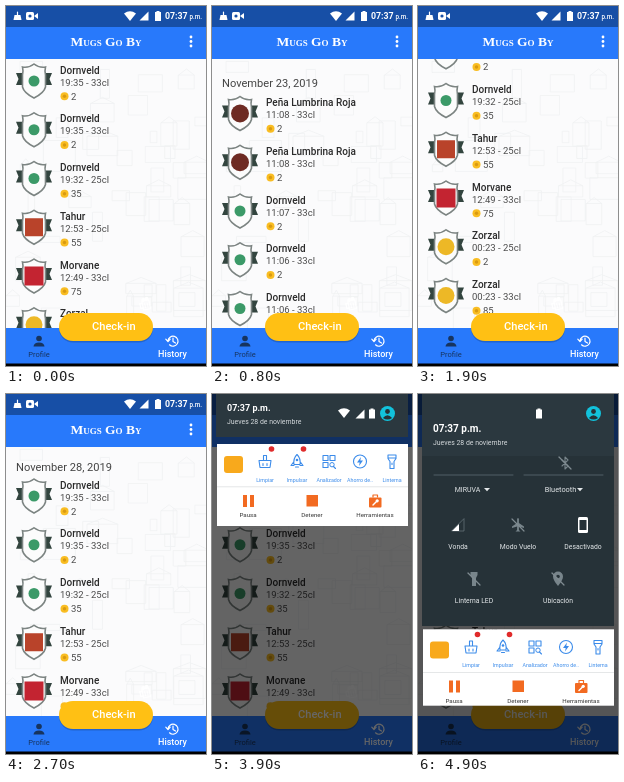
Write an HTML page that moves like this. It is 200x360 px and loops after 5000 ms.

```html
<!DOCTYPE html>
<html lang="en">
<head>
<meta charset="utf-8">
<title>Check-in history</title>
<style>
  html, body { margin: 0; width: 100%; height: 100%; overflow: hidden; background: #000; }
  svg { display: block; width: 100vw; height: 100vh; font-family: Roboto, sans-serif; }
</style>
</head>
<body>
<svg id="stage" viewBox="0 0 200 360"></svg>
<script>
const LOOP = 5000, STEP = 100;
const BLUE = '#2879fb', AMBER = '#ffc014', ORANGE = '#f26a21', PANEL = '#263238', INK = '#2b2b2b';
const stage = document.getElementById('stage');

// ---- markup helpers ----
const rect = (x, y, w, h, fill, more = '') =>
  `<rect x="${x}" y="${y}" width="${w}" height="${h}" fill="${fill}" ${more}/>`;
const dot = (x, y, r, fill) => `<circle cx="${x}" cy="${y}" r="${r}" fill="${fill}"/>`;
const fillPath = (d, fill) => `<path d="${d}" fill="${fill}"/>`;
const line = (d, color, w = 1) =>
  `<path d="${d}" fill="none" stroke="${color}" stroke-width="${w}" stroke-linecap="round" stroke-linejoin="round"/>`;
const text = (x, y, size, fill, str, more = '') =>
  `<text x="${x}" y="${y}" font-size="${size}" fill="${fill}" ${more}>${str}</text>`;
const mid = (x, y, size, fill, str, more = '') =>
  text(x, y, size, fill, str, 'text-anchor="middle" ' + more);
const at = (x, y, body, more = '') => `<g transform="translate(${x} ${y})" ${more}>${body}</g>`;

// ---- icons, centred on 0,0 ----
const wifi = fill => fillPath('M0 5 L-6 -2.5 Q0 -7 6 -2.5 Z', fill);
const signal = fill => fillPath('M-4.5 4.5 H4.5 V-4.5 Z', fill);
const battery = fill => fillPath('M-3 -4 H-1.5 V-5 H1.5 V-4 H3 V5 H-3 Z', fill);
const avatar = dot(0, 0, 7.5, '#12c2dc') + dot(0, -2, 2.4, PANEL) +
  fillPath('M-4.6 4.4 Q0 -1 4.6 4.4 Q0 7.5 -4.6 4.4 Z', PANEL);
const slash = line('M-6 -6 L6 6', '#7f8b91', 1.2);

// ---- list ----
const BEERS = {
  D: ['Dornveld', dot(0, 0, 5.5, '#3c9a68')],
  P: ['Peña Lumbrina Roja', dot(0, 0, 9, '#6e2b23')],
  T: ['Tahur', rect(-9, -9, 18, 18, '#b9432a')],
  M: ['Morvane', rect(-9.5, -9.5, 19, 19, '#c32431')],
  Z: ['Zorzal', dot(0, 0, 8.5, '#edb826')]
};
const SECTIONS = [
  { date: 'November 28, 2019', top: 94.5, gap: 18, rows: [
    'D 19:35 33 2', 'D 19:35 33 2', 'D 19:32 25 35', 'T 12:53 25 55',
    'M 12:49 33 75', 'Z 00:23 25 2', 'Z 00:23 33 85'] },
  { date: 'November 23, 2019', top: 473.5, gap: 19.5, rows: [
    'P 11:08 33 2', 'P 11:08 33 2', 'D 11:07 33 2', 'D 11:06 33 2',
    'D 11:06 33 2', 'D 11:05 33 2'] }
];
const ROW = 48.75;
const SHIELD = 'M-11.5 -14 Q-5 -13 0 -17 Q5 -13 11.5 -14 Q10.5 -10 11.5 -6 V6 Q10 12 0 17 Q-10 12 -11.5 6 V-6 Q-10.5 -10 -11.5 -14 Z';

function badge(mark) {
  return fillPath('M-18 -8 H18 L15.5 -2 L18 4 H-18 L-15.5 -2 Z', '#33453f') +
    `<path d="${SHIELD}" fill="#fcfcfc" stroke="#7c8482" stroke-width="1.6"/>` + mark;
}

function row(spec, y) {
  const [key, time, size, points] = spec.split(' ');
  const [name, mark] = BEERS[key];
  return at(0, y,
    at(28, 7.5, badge(mark)) +
    text(54, 0, 10, INK, name, 'font-weight="500"') +
    text(54, 12, 9.5, '#4a4a4a', `${time} - ${size}cl`) +
    dot(58.5, 22.8, 4, '#f9bd22') + dot(58.5, 22.8, 1.7, '#d99a12') +
    text(65, 26, 9.5, '#4a4a4a', points));
}

const list = SECTIONS.map(s =>
  text(10, s.top - s.gap, 11.1, '#444', s.date) +
  s.rows.map((r, i) => row(r, s.top + i * ROW)).join('')).join('');

// Faint sketch of houses behind the list
function backdrop() {
  let seed = 7, out = '';
  const rnd = n => (seed = (seed * 16807) % 2147483647) / 2147483647 * n;
  for (let i = 0; i < 46; i++) {
    const x = rnd(190), y = 55 + rnd(255), w = 6 + rnd(26), h = 5 + rnd(26);
    out += `M${x} ${y}h${w}v${h}h${-w}z`;
    if (i % 3 === 0) out += `M${x} ${y}l${w / 2} -6l${w / 2} 6`;
  }
  return line(out, '#f0f1f3', 0.8);
}

// ---- app chrome ----
const statusBar = rect(0, 0, 200, 21, '#174fa6') +
  line('M11.5 6 V9', '#fff', 1.2) + fillPath('M8.5 9 H14.5 L15.5 14 H7.5 Z', '#fff') +
  rect(20, 6, 8, 8, '#fff', 'rx="1.5"') + fillPath('M28 10 L32 7 V13 Z', '#fff') + dot(24, 10, 1.6, '#174fa6') +
  at(124, 10, wifi('#fff')) + at(138, 10, signal('#fff')) + at(152, 10, battery('#fff')) +
  text(159, 13, 8.8, '#fff', '07:37', 'font-weight="700"') +
  text(183.5, 13, 6.3, '#fff', 'p.m.', 'font-weight="500"');

const appBar = rect(0, 21, 200, 32, BLUE) +
  mid(100, 40, 13.5, '#fff', 'Mugs Go By',
    'font-family="Liberation Serif, serif" font-weight="700" style="font-variant:small-caps"') +
  [31, 35.5, 40].map(y => dot(185, y, 1.4, '#fff')).join('');

const navBar = rect(0, 322, 200, 36, BLUE) + rect(0, 357.5, 200, 2.5, '#000') +
  dot(33, 332.5, 2.8, '#17345f') + fillPath('M27.5 340.5 Q28 336.5 33 336.5 Q38 336.5 38.5 340.5 Z', '#17345f') +
  mid(33, 351, 7.5, '#17345f', 'Profile') +
  line('M162 335 A5 5 0 1 1 163.5 338.8 M159.8 333.2 L162 335.6 L164.2 333.2 M167 332 V335.5 L169.5 337', '#fff', 1.2) +
  mid(166.5, 351, 9, '#fff', 'History', 'font-weight="500"');

const mug = line('M-3.5 -3 H3.5 V6 H-3.5 Z M-3.5 -1 H-6 V4 H-3.5', '#fff', 1.2) +
  line('M-1.2 0 V4 M1.3 0 V4', '#fff', 0.9) + dot(-2, -4, 1.8, '#fff') + dot(1.5, -4.3, 2, '#fff');
const button = rect(53, 308.5, 94, 28, '#000', 'rx="14" opacity=".18"') +
  rect(53, 307, 94, 28, AMBER, 'rx="14"') +
  at(75, 320, mug, 'style="rotate:-12deg"') +
  text(86, 324, 11.1, '#fff', 'Check-in', 'font-weight="500"');

// ---- notification cards, y measured from the top of the first card ----
const TOOL = '#3b8bea';
const tools = [
  ['Limpiar', 53, line('M-6 -1 H6 L5 6 H-5 Z M-2 2 V4 M2 2 V4 M-1.5 -1 V-6 H1.5 V-1', TOOL, 1.1)],
  ['Impulsar', 85, line('M0 -7 Q4 -3 3 3 H-3 Q-4 -3 0 -7 Z M-3 0 L-6 4 H-3 M3 0 L6 4 H3 M-1.5 5.5 H1.5', TOOL, 1.1) + dot(0, -1.5, 1.3, TOOL)],
  ['Analizador', 117, line('M-6 -6 H-1 V-1 H-6 Z M1 -6 H6 V-1 H1 Z M-6 1 H-1 V6 H-6 Z M4.5 5 L6.5 7', TOOL, 1.1) +
    `<circle cx="3" cy="3.2" r="2.2" fill="none" stroke="${TOOL}"/>`],
  ['Ahorro de..', 148, `<circle r="6.5" fill="none" stroke="${TOOL}" stroke-width="1.1"/>` + fillPath('M1 -4.5 L-3 1 H-.3 L-1 4.5 L3 -1 H.3 Z', TOOL)],
  ['Linterna', 180, line('M-4 -6.5 H4 V-3 L2 0 V7 H-2 V0 L-4 -3 Z M-4 -3.5 H4 M0 1.5 V3', TOOL, 1.1)]
];
const card1 = rect(5, 0, 191, 42.5, '#fff') +
  rect(12, 12, 19, 17, '#f8a91c', 'rx="3"') +
  tools.map(([label, x, icon]) => at(x, 17.5, icon) + mid(x, 37.8, 5.3, TOOL, label)).join('') +
  dot(59.5, 5, 2.8, '#e02b2b') + dot(91.5, 5, 2.8, '#e02b2b');

const actions = [['Pausa', 36], ['Detener', 100], ['Herramientas', 163]];
const card2 = rect(5, 43.2, 191, 45, '#fff') +
  rect(31, 51, 4, 12, ORANGE) + rect(38, 51, 4, 12, ORANGE) +
  rect(94.5, 51, 11.5, 11.5, ORANGE) +
  rect(157, 53.5, 12.5, 10, ORANGE, 'rx="1"') + line('M161 53 V51 H165.5 V53', ORANGE, 1.2) +
  line('M161 61 L165.5 56.5', '#fff', 1.4) + dot(165.2, 56.8, 1.6, '#fff') +
  actions.map(([label, x]) => mid(x, 73.2, 6.2, '#333', label)).join('');

// ---- quick settings tiles, y measured from the panel's bottom edge ----
const GREY = '#78858b';
const plane = fillPath('M-.9 -6 Q0 -8 .9 -6 V-2 L6 1.5 V3 L.9 1.5 V5 L2.5 6.5 H-2.5 L-.9 5 V1.5 L-6 3 V1.5 L-.9 -2 Z', GREY);
const tile = (x, y, icon, label) => at(x, y, icon) + mid(x, y + 24, 6.8, '#e4e8ea', label);
const arrow = (x, y) => fillPath(`M${x - 3} ${y} h6 l-3 3.2 z`, '#e4e8ea');
const tiles =
  at(54, -164, wifi('#fff'), 'style="scale:1.25"') +
  at(147, -163, line('M-3 -3 L3 3 L0 6 V-6 L3 -3 L-3 3', GREY, 1.1) + slash) +
  line('M16 -151 H95 M106 -151 H185', '#647279', 0.7) +
  mid(49.5, -134, 7, '#e4e8ea', 'MIRUVA') + arrow(69, -138) +
  mid(142.5, -134, 7.4, '#e4e8ea', 'Bluetooth') + arrow(162, -138) +
  tile(40, -101, line('M-6 6 H6 V-6 Z', GREY, 0.6) + fillPath('M-6 6 H1 V-1 Z', '#fff'), 'Vonda') +
  tile(100, -101, plane + slash, 'Modo Vuelo') +
  tile(165, -101, rect(-5, -8, 10, 16, '#fff', 'rx="1.5"') + rect(-3.5, -5, 7, 10, PANEL), 'Desactivado') +
  tile(56, -47, fillPath('M-3.5 -7 H3.5 V-4 L2 -1 V7 H-2 V-1 L-3.5 -4 Z', GREY) + slash, 'Linterna LED') +
  tile(140, -47, fillPath('M0 7 Q-5 1 -5 -2.5 A5 5 0 0 1 5 -2.5 Q5 1 0 7 Z', GREY) + dot(0, -2.5, 1.8, PANEL) + slash, 'Ubicación');

stage.innerHTML = `
  <defs>
    <clipPath id="cardClip"><rect id="cardBox" x="0" y="-2" width="200" height="84"/></clipPath>
    <clipPath id="tileClip"><rect id="tileBox" x="4" y="63" width="192" height="0"/></clipPath>
  </defs>
  ${rect(0, 0, 200, 360, '#fbfbfc')}${backdrop()}
  <g id="list">${list}</g>
  ${appBar}${statusBar}${navBar}${button}
  ${rect(0, 0, 200, 360, '#000', 'id="dim"')}
  <g id="shade">
    ${rect(4, 0, 192, 42, PANEL, 'id="panel"')}
    <g clip-path="url(#tileClip)"><g id="tiles">${tiles}</g></g>
    ${rect(4, 0, 192, 42, '#2b383f', 'id="head"')}
    ${text(15, 0, 9, '#fff', '07:37 p.m.', 'id="clock" font-weight="700"')}
    ${text(15, 0, 6.9, '#d5dadd', 'Jueves 28 de noviembre', 'id="day"')}
    <g id="radio">${at(132, 19, wifi('#fff'))}${at(148, 20, signal('#fff'))}</g>
    <g id="power">${battery('#fff')}</g>
    ${at(175.5, 19.5, avatar)}
    <g id="cards"><g clip-path="url(#cardClip)">${rect(5, 0, 191, 88, '#d9dcde')}${card1}${card2}</g></g>
  </g>`;

// ---- motion tables: [ms, value] ----
const SCROLL = [[0, 27], [100, 48], [200, 90], [300, 150], [400, 218], [500, 280], [600, 326], [700, 356],
  [800, 373.5], [1000, 388], [1200, 374], [1300, 348], [1500, 264], [1700, 174], [1900, 105],
  [2100, 50], [2300, 14], [2500, 0]];
const OPEN = [[2700, 0], [2800, 0.5], [2900, 1]];
const REVEAL = [[2900, 0], [3100, 0.36], [3300, 0.75], [3600, 1]];
const EXPAND = [[4400, 0], [4600, 0.3], [4800, 0.82], [4900, 1]];

function pick(table, t) {
  if (t <= table[0][0]) return table[0][1];
  for (let i = 1; i < table.length; i++) {
    const [a, va] = table[i - 1], [b, vb] = table[i];
    if (t <= b) return va + (vb - va) * (t - a) / (b - a);
  }
  return table[table.length - 1][1];
}
const mix = (a, b, k) => a + (b - a) * k;
const ids = {};
stage.querySelectorAll('[id]').forEach(n => ids[n.id] = n);
const set = (id, name, value) => ids[id].setAttribute(name, value);
const move = (id, x, y) => set(id, 'transform', `translate(${x} ${y})`);

function draw(t) {
  const open = pick(OPEN, t), reveal = pick(REVEAL, t), grow = pick(EXPAND, t);
  move('list', 0, -pick(SCROLL, t));
  set('dim', 'opacity', open * (0.54 + 0.06 * reveal + 0.06 * grow));
  set('shade', 'visibility', open ? 'visible' : 'hidden');
  move('shade', 0, -92 * (1 - open));

  const headH = mix(mix(40.5, 43, reveal), 62, grow);
  const bottom = mix(headH, 232, grow);
  set('head', 'height', headH);
  set('panel', 'height', bottom);
  set('tileBox', 'y', headH);
  set('tileBox', 'height', Math.max(0, bottom - headH));
  move('tiles', 0, bottom);
  set('tiles', 'opacity', grow);
  set('clock', 'y', mix(17, 38, grow));
  set('clock', 'font-size', mix(9, 10, grow));
  set('day', 'y', mix(mix(29.3, 30.3, reveal), 50.5, grow));
  set('radio', 'opacity', Math.max(0, 1 - grow * 2));
  move('power', mix(160, 121, grow), 19.5);
  move('cards', 0, mix(mix(46, 50, reveal), 235.5, grow));
  set('cardBox', 'height', mix(mix(46, 84, reveal), 78, grow));
}

const start = performance.now();
function tick() {
  const t = (performance.now() - start) % LOOP;
  draw(Math.floor(t / STEP) * STEP);
  requestAnimationFrame(tick);
}
draw(0);
requestAnimationFrame(tick);
</script>
</body>
</html>
```
